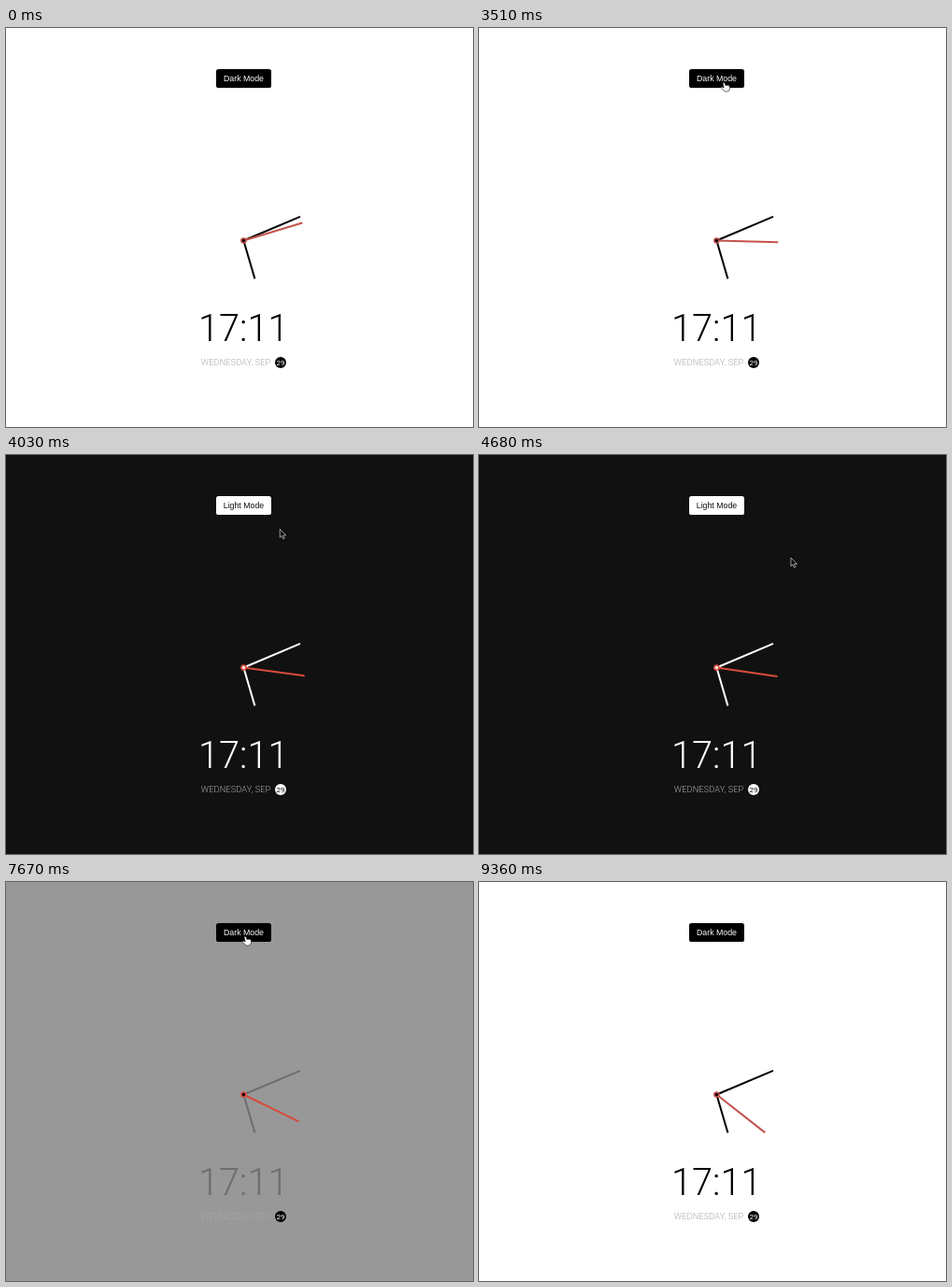
Recreate the animation shown at these times as an HTML page. Size 500 by 427 pixels, loop 9620 ms.

```html
<!DOCTYPE html>
<html lang="en">
<head>
<meta charset="utf-8">
<title>Theme clock</title>
<style>
  html, body { margin: 0; width: 100%; height: 100%; overflow: hidden; }
  svg { display: block; width: 500px; height: 427px; }
  text { font-family: Roboto, sans-serif; }
  #label { font: 8.8px "Liberation Sans", Arial, sans-serif; text-anchor: middle; }
  #time { font-size: 39.8px; font-weight: 300; text-anchor: middle; }
  #date { font-size: 9.24px; font-weight: 300; letter-spacing: .1px; fill: #aaa; }
  #day { font-size: 7.9px; text-anchor: middle; }
  .hand { stroke-width: 2; }
</style>
</head>
<body>
<svg viewBox="0 0 500 427">
  <rect id="page" width="500" height="427"/>
  <rect id="button" x="225" y="44" width="59" height="20" rx="2.6"/>
  <text id="label" x="254.5" y="57.2"></text>
  <g transform="translate(254.4 227.5)">
    <path id="hour" class="hand" d="M0 0V-42.6"/>
    <path id="minute" class="hand" d="M0 0V-65.8"/>
    <path id="second" class="hand" d="M0 0V-65.8"/>
    <circle id="hub" r="3.3"/>
    <circle id="dot" r="1.65"/>
  </g>
  <text id="time" x="254.3" y="335">17:11</text>
  <text id="date" x="208.8" y="361">WEDNESDAY, SEP</text>
  <circle id="badge" cx="294" cy="358" r="6"/>
  <text id="day" x="294" y="360.8">29</text>
  <g id="cursor" stroke-linejoin="round">
    <path id="arrow" d="M0 0V9L2 7.1 3.4 10.4 4.9 9.8 3.5 6.6H6.4Z" fill="#000" stroke="#ddd" stroke-width=".7"/>
    <path id="pointer" d="M-1 .8Q0-.6 1 .8L2 3.6Q3 2.6 3.8 3.4 5 2.7 5.5 3.8 6.5 3.7 6.5 5V7Q6.3 9.8 3.5 10H1.5Q0 9-2.5 6.4-3.4 5 -2 4.9L.2 5.9Z" fill="#fff" stroke="#222" stroke-width=".7"/>
  </g>
</svg>
<script>
const LOOP = 9620, STEP = 130, FADE = 500;
const FIRST_TICK = 365, TICK = 1042;
const DARK_AT = 3525, LIGHT_AT = 7315;

// time, x, y of the mouse
const route = [
  [1820, 382, 400], [2080, 398, 353], [2210, 398, 353], [2470, 400, 335],
  [3250, 262, 58], [3600, 262, 58], [3770, 277, 67], [4680, 334, 110],
  [5200, 345, 114], [5460, 345, 114], [6500, 256, 58], [7670, 256, 58],
  [8580, 383, 427]
];

const $ = id => document.getElementById(id);
const set = (id, name, value) => $(id).setAttribute(name, value);
const mix = (a, b, k) => a + (b - a) * k;
const gray = (a, b, k) => `rgb(${Array(3).fill(Math.round(mix(a, b, k)))})`;

// CSS ease-in: cubic-bezier(.42, 0, 1, 1)
function easeIn(x) {
  if (x <= 0) return 0;
  if (x >= 1) return 1;
  let lo = 0, hi = 1, s;
  for (let i = 0; i < 24; i++) {
    s = (lo + hi) / 2;
    const bx = 1.26 * (1 - s) ** 2 * s + 3 * (1 - s) * s * s + s ** 3;
    if (bx < x) lo = s; else hi = s;
  }
  return 3 * (1 - s) * s * s + s ** 3;
}

const turn = (id, angle) => set(id, 'transform', `rotate(${angle})`);

function moveCursor(t) {
  const i = route.findIndex(p => p[0] > t);
  const shown = i > 0;
  set('cursor', 'visibility', shown ? 'visible' : 'hidden');
  if (!shown) return;
  const [a, b] = [route[i - 1], route[i]];
  const k = (t - a[0]) / (b[0] - a[0]);
  const x = mix(a[1], b[1], k), y = mix(a[2], b[2], k);
  const hover = x >= 225 && x <= 284 && y >= 44 && y <= 64;
  set('cursor', 'transform', `translate(${x} ${y})`);
  set('arrow', 'display', hover ? 'none' : 'inline');
  set('pointer', 'display', hover ? 'inline' : 'none');
}

function draw(t) {
  const isDark = t >= DARK_AT && t < LIGHT_AT;
  const dark = easeIn((t - DARK_AT) / FADE) - easeIn((t - LIGHT_AT) / FADE);
  const ink = gray(0, 255, dark);

  set('page', 'fill', gray(255, 17, dark));
  set('button', 'fill', isDark ? '#fff' : '#000');
  set('label', 'fill', isDark ? '#111' : '#fff');
  $('label').textContent = isDark ? 'Light Mode' : 'Dark Mode';
  set('dot', 'fill', isDark ? '#fff' : '#000');
  set('hour', 'stroke', ink);
  set('minute', 'stroke', ink);
  set('time', 'fill', ink);

  const red = dark > 0 ? '#d94c3c' : '#c4524c';
  set('second', 'stroke', red);
  set('hub', 'fill', red);

  // Seconds run 0-59 and hours 0-11 over a full turn
  const ticks = Math.floor((t - FIRST_TICK) / TICK);
  const lastTick = FIRST_TICK + ticks * TICK;
  turn('hour', 5 * 360 / 11);
  turn('minute', 11 * 360 / 59);
  turn('second', (12 + ticks + easeIn((t - lastTick) / FADE)) * 360 / 59);

  // The date is rebuilt at each tick, which cuts its fade short
  const click = t >= LIGHT_AT ? LIGHT_AT : DARK_AT;
  const badge = lastTick > click ? +isDark : dark;
  set('badge', 'fill', gray(0, 255, badge));
  set('day', 'fill', gray(255, 17, badge));

  moveCursor(t);
}

const start = performance.now();
function frame() {
  const t = (performance.now() - start) % LOOP;
  draw(Math.floor(t / STEP) * STEP);
  requestAnimationFrame(frame);
}
frame();
</script>
</body>
</html>
```
